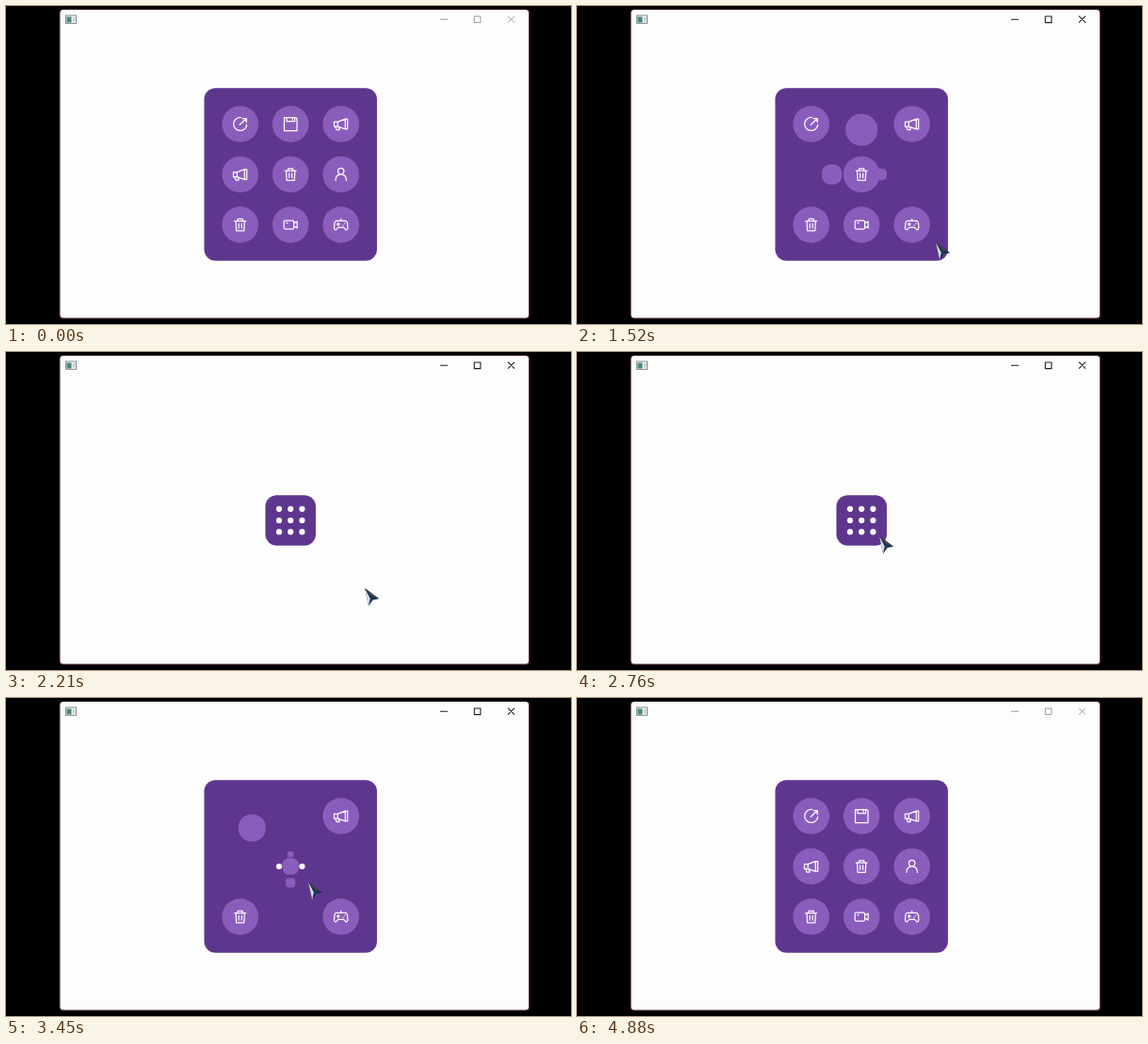
Write an HTML page that moves like this. It is 600 px wide and 338 px high and loops after 4940 ms.

```html
<!DOCTYPE html>
<html lang="en">
<head>
<meta charset="utf-8">
<title>Dot menu</title>
<style>
  html, body { margin: 0; width: 100%; height: 100%; overflow: hidden; background: #000; }
  svg { display: block; width: 100%; height: 100%; }
  .icon { fill: none; stroke: #fdfbff; stroke-width: 1.25; stroke-linecap: round; stroke-linejoin: round; }
</style>
</head>
<body>
<svg viewBox="0 0 600 338">
  <defs>
    <clipPath id="frame"><rect x="57" y="4" width="499" height="328" rx="4"/></clipPath>
  </defs>
  <rect width="600" height="338"/>
  <rect x="56.6" y="3.6" width="499.8" height="328.8" rx="4" fill="#54233b"/>
  <rect x="57.5" y="4" width="497.5" height="327.5" rx="3.5" fill="#fdfdfd"/>

  <g>
    <rect x="63.5" y="10" width="11" height="8.4" fill="#f4f6f6" stroke="#858b8b"/>
    <rect x="64.5" y="11.5" width="5" height="6" fill="#4b8580"/>
    <rect x="71" y="12" width="2.3" height="4.5" fill="#c3cccc"/>
  </g>
  <path id="buttons" d="M461 14.2H469M497.3 11H503.9V17.6H497.3ZM533 10.7L540 17.7M540 10.7L533 17.7" fill="none"/>

  <rect id="panel" rx="12" fill="#5f368e"/>
  <g id="items"></g>

  <g clip-path="url(#frame)">
    <g id="cursor">
      <path d="M0 0L15 11.2L8.4 12.6L4.2 19Z" fill="#10243f"/>
      <path d="M0 0L4.2 19L5.8 11Z" fill="#d5d9dc"/>
      <path d="M0 0L15 11.2L6.5 9Z" fill="#3a4350"/>
      <path d="M6 10L11 11L6.2 14.5Z" fill="#17406c"/>
    </g>
  </g>
</svg>
<script>
const LOOP = 4940;
const CX = 302.2, CY = 179;
const DOT_GAP = 12.2, ITEM_GAP = 53.5;
const DOT = 6.2, ITEM = 38.6;
const STAGGER = 62.5, MOVE = 262, PANEL_MOVE = 255;
const CLOSE_LAST = 1876, OPEN_FIRST = 3045;

const icons = {
  share: 'M.8 -7A7 7 0 1 0 7 .8M-.5 .8L6.4 -5.8M2.4 -6H6.6V-1.8',
  save: 'M-6.7 -7H5.4L6.8 -5.7V7H-6.7ZM-4.2 -7V-2.8H4.4V-7M2 -5.9V-4.4',
  horn: 'M-7.2 -2.3H-3.4V2.7H-7.2ZM-3.4 -2.3L4.6 -5.3V5.3L-3.4 2.7M4.6 -5.3H7V5.3H4.6M-5.8 2.7L-4.7 6H-1.6L-2.4 3.2',
  trash: 'M-6 -4H6M-2.6 -4V-6.2H2.6V-4M-4.6 -4L-4.1 6.3H4.1L4.6 -4M-1.5 -1.2V3.6M1.5 -1.2V3.6',
  user: 'M-3.2 -3.4A3.2 3.2 0 1 1 3.2 -3.4A3.2 3.2 0 1 1 -3.2 -3.4M-5.8 6.4C-5.8 2.2 -3.4 -.2 0 -.2S5.8 2.2 5.8 6.4',
  video: 'M-5.8 -4.5H2.2Q3.4 -4.5 3.4 -3.3V3.3Q3.4 4.5 2.2 4.5H-5.8Q-7 4.5 -7 3.3V-3.3Q-7 -4.5 -5.8 -4.5ZM3.4 -1.6L7 -3.4V3.4L3.4 1.6M-4.4 -2H-3.2',
  pad: 'M-4.6 -4.2H4.6Q6.4 -4.2 6.8 -2L7.2 3Q7.2 5.6 5.2 5.4L3 2.8H-3L-5.2 5.4Q-7.2 5.6 -7.2 3L-6.8 -2Q-6.4 -4.2 -4.6 -4.2ZM0 -4.2V-6.2M-4.4 -.6H-1.4M-2.9 -2.1V.9M2.2 .5H2.5M4 -1.5H4.3'
};

// column, row, icon; listed in opening order
const layout = [
  [-1, 1, 'trash'], [1, -1, 'horn'], [1, 1, 'pad'], [-1, -1, 'share'],
  [0, 0, 'trash'], [0, 1, 'video'], [0, -1, 'save'], [-1, 0, 'horn'], [1, 0, 'user']
];

// time, x, y of the pointer tip
const route = [
  [330, 558, 332], [580, 412, 250], [850, 380, 248], [1090, 380, 248],
  [1330, 381, 251], [2230, 381, 251], [2680, 321, 195.5], [3560, 321, 195.5],
  [3750, 369, 267], [3930, 370, 268], [4170, 370, 268], [4360, 558, 334]
];

const $ = id => document.getElementById(id);
const lerp = (a, b, k) => a + (b - a) * k;
const clamp = k => Math.min(1, Math.max(0, k));
const smooth = k => k * k * (3 - 2 * k);

function add(parent, tag, attrs) {
  const el = document.createElementNS('http://www.w3.org/2000/svg', tag);
  set(el, attrs);
  return parent.appendChild(el);
}

function set(el, attrs) {
  for (const key in attrs) el.setAttribute(key, attrs[key]);
}

function setBox(el, x, y, size) {
  set(el, { x: x - size / 2, y: y - size / 2, width: size, height: size });
}

const items = layout.map(([col, row, name]) => ({
  col, row,
  blob: add($('items'), 'rect', {}),
  icon: add($('items'), 'path', {
    d: icons[name], class: 'icon',
    transform: `translate(${CX + col * ITEM_GAP} ${CY + row * ITEM_GAP})`
  })
}));

// 1 is open, 0 is closed; closing is the opening curve run backwards
function openness(t, closeAt, openAt, span) {
  const k = t < 2600 ? 1 - clamp((t - closeAt) / span) : clamp((t - openAt) / span);
  return k * k;
}

function drawItem(item, index, t) {
  const delay = index * STAGGER;
  const k = openness(t, CLOSE_LAST - delay, OPEN_FIRST + delay, MOVE);
  const isDot = k < 0.01;
  const gap = lerp(DOT_GAP, ITEM_GAP, k);
  const size = lerp(DOT, ITEM, k);
  setBox(item.blob, CX + item.col * gap, CY + item.row * gap, size);
  set(item.blob, {
    rx: size / 2 * (isDot ? 1 : lerp(0.75, 1, k)),
    fill: isDot ? '#fff' : '#8a5dbd'
  });
  item.icon.style.display = k === 1 ? '' : 'none';
}

function drawCursor(t) {
  const next = route.findIndex(p => p[0] > t);
  $('cursor').style.display = next > 0 ? '' : 'none';
  if (next < 1) return;
  const [t0, x0, y0] = route[next - 1], [t1, x1, y1] = route[next];
  const k = smooth((t - t0) / (t1 - t0));
  set($('cursor'), { transform: `translate(${lerp(x0, x1, k)} ${lerp(y0, y1, k)})` });
}

function draw(t) {
  const active = t >= 1365 && t < 4740;
  set($('buttons'), { stroke: active ? '#222' : '#999', 'stroke-width': active ? 1.1 : 1 });
  setBox($('panel'), CX, CY, lerp(53.5, 183.5, openness(t, 1955, 3000, PANEL_MOVE)));
  items.forEach((item, i) => drawItem(item, i, t));
  drawCursor(t);
}

const start = performance.now();
function tick() {
  draw((performance.now() - start) % LOOP);
  requestAnimationFrame(tick);
}
tick();
</script>
</body>
</html>
```
